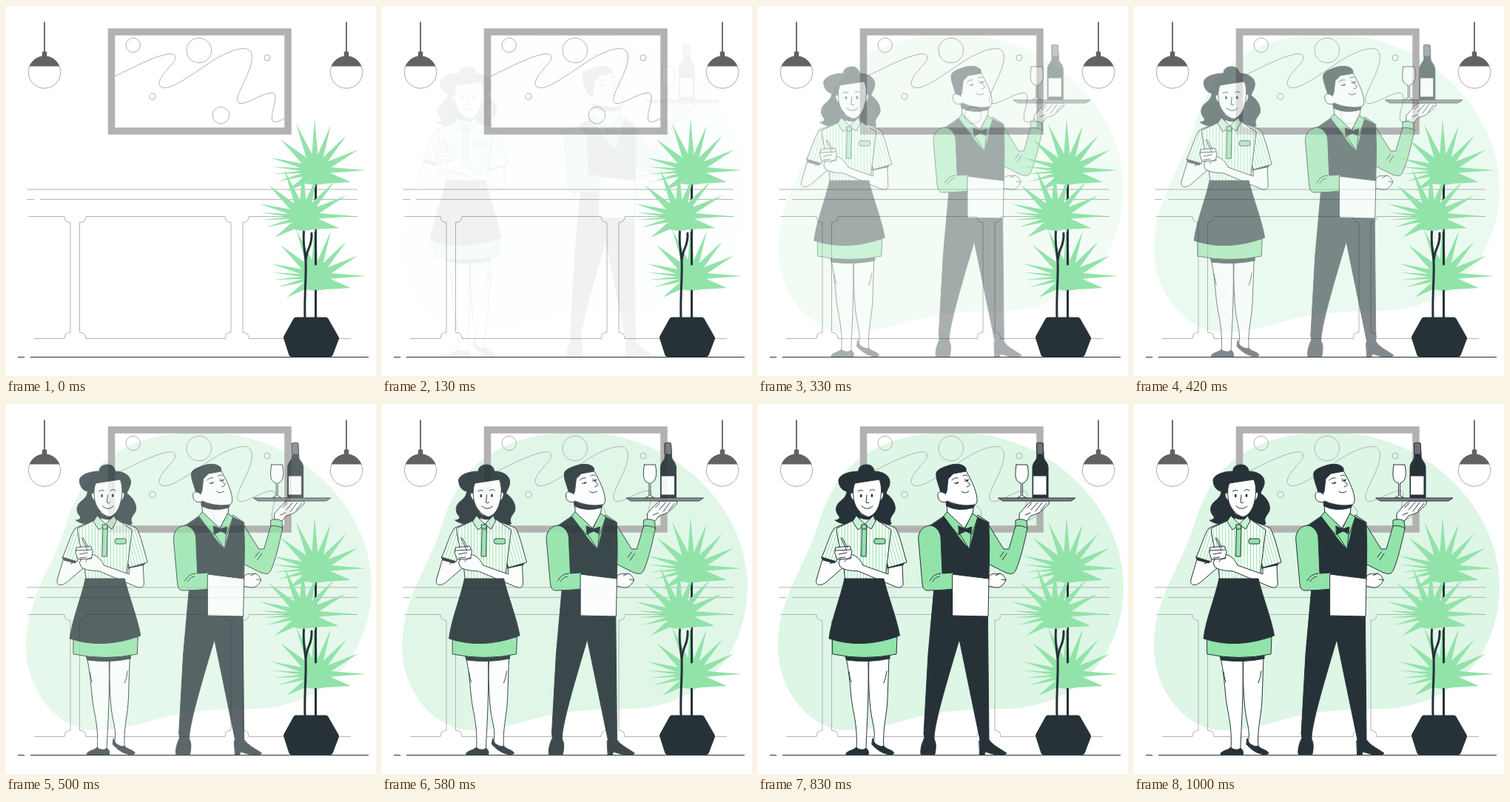
These frames come from a looping animation (500x500 px, 1.04 s). An HTML page:

```html
<!DOCTYPE html>
<html lang="en">
<head>
<meta charset="utf-8">
<title>Restaurant staff</title>
<style>
  html, body { margin: 0; width: 100%; height: 100%; overflow: hidden; background: #fff; }
  svg { display: block; width: 100vw; height: 100vh; }
  .wall { fill: none; stroke: #b2b2b2; stroke-width: 1; }
  .person { stroke: #263238; stroke-width: 1; stroke-linejoin: round; stroke-linecap: round; fill: #fff; }
  .person .dark { fill: #263238; }
  .person .green { fill: #92e3a9; }
  .person .pale { fill: #c8f1d4; }
  .person .line { fill: none; }
  .person .dot { fill: #263238; stroke: none; }
  .stem { fill: none; stroke: #263238; stroke-width: 3; stroke-linecap: round; }
</style>
</head>
<body>
<svg viewBox="0 0 500 500">
  <defs>
    <pattern id="stripe" width="4.2" height="8" patternUnits="userSpaceOnUse">
      <rect width="4.2" height="8" fill="#fff" stroke="none"/>
      <path d="M2 0V8" stroke="#92e3a9" stroke-width="1.1"/>
    </pattern>
    <pattern id="stripeL" href="#stripe" patternTransform="rotate(18)"/>
    <pattern id="stripeR" href="#stripe" patternTransform="rotate(-16)"/>
    <g id="lamp">
      <circle cx="52" cy="89.5" r="21.7" fill="#fff" stroke="#aaa"/>
      <path d="M31.8 81.5C35 73 43 67.6 52 67.6S69 73 72.2 81.5Z" fill="#626262"/>
      <path d="M52 21.500V63" stroke="#626262" stroke-width="1.8"/>
      <rect x="48.800" y="61.500" width="6.400" height="7" rx="1" fill="#626262"/>
    </g>
    <polygon id="leaf" fill="#92e3a9"/>
  </defs>

  <path id="blob" fill="#ddf6e5" d="M27 327C27 265 62 222 81 165C96 115 128 38 265 38C400 38 494 145 494 245C494 340 430 408 340 412C285 412 245 414 200 427C165 438 140 441 122 441C72 441 27 390 27 327Z"/>

  <g class="wall">
    <path d="M28 247.900H475M28 261.400H38M46 261.400H475"/>
    <path d="M30 284.500H79Q79 292.500 87 292.500V441Q79 441 79 449.500H38"/>
    <path d="M108 284.500H296Q296 292.500 304 292.500V441Q296 441 296 449.500H108Q108 441 99.500 441V292.500Q108 292.500 108 284.500Z"/>
    <path d="M475 284.500H328Q328 292.500 320 292.500V441Q328 441 328 449.500H466"/>
    <rect x="142.500" y="35" width="238.500" height="134" stroke-width="9.500"/>
    <path d="M147 95C172 83 198 69 218 65C230 63 232 70 224 79C212 92 203 103 209 109C219 118 256 89 279 74C305 58 329 51 332 65C336 85 309 119 313 129C318 140 351 113 362 118C369 123 356 147 360 155C364 160 371 154 376 152"/>
    <circle cx="171.800" cy="53" r="9.700"/>
    <circle cx="260.800" cy="60" r="16.800"/>
    <circle cx="353" cy="70" r="4"/>
    <circle cx="198" cy="122.300" r="4.300"/>
    <circle cx="290.500" cy="147.700" r="11.300"/>
  </g>
  <use href="#lamp"/>
  <use href="#lamp" x="408"/>
  <path d="M16 474.500H25M33 474.500H490" stroke="#263238"/>

  <g id="woman" class="person">
    <path class="dark" d="M134 91C133 85 139 82 145 82C151 82 155 86 155 91C166 91 175 96 176 104C177 111 172 116 171 121C179 126 185 136 183 144C181 150 174 153 178 162C169 166 157 165 151 160L130 160C122 164 110 163 102 157C106 157 109 155 108 152C101 145 103 136 110 131C115 127 118 123 118 118C111 117 107 110 107 103C108 95 122 91 134 91Z"/>
    <path d="M135 143L136 158L145 166L154 156L154 143Z"/>
    <path class="dark" d="M135 147Q145 156 155 147V153Q145 159 135 153Z"/>
    <path d="M127 121C122 117 121 126 128 131M164 120C169 116 169 127 163 131"/>
    <path d="M129 107Q148 104 162 102C166 112 165 124 162 135C159 146 152 152 147 152.500C140 151 131 143 128 132C126 122 126 113 129 107Z"/>
    <ellipse class="dot" cx="137.300" cy="124" rx="1.400" ry="2.200"/>
    <ellipse class="dot" cx="152" cy="123.800" rx="1.400" ry="2.200"/>
    <path class="line" d="M133 118Q136 115 140 117M149 117Q153 114 156 117M145 123L144 133Q146 135 148 133M138 138Q146 145 153 138"/>

    <path d="M117 343C121 360 122 376 124 396C126 416 133 434 131 466L144 468C144 446 148 410 147 346Z"/>
    <path d="M148 346C147 368 148 394 150 412C152 430 158 443 154 458L168 465C166 440 172 422 173 400L175 343Z"/>
    <path class="line" d="M121 362Q122 371 124 376M172 361Q171 370 168 377"/>
    <path class="dark" d="M117 472C120 468 127 468 131 464C136 469 140 468 144 465Q149 469 147 474H118Z"/>
    <path class="dark" d="M153 452C156 463 164 464 168 462C171 467 180 467 182 472Q179 475 172 473C163 471 157 465 152 460Z"/>
    <path class="dark" d="M116 340H176V344Q148 350 118 346Z"/>
    <path class="green" d="M99 316L186 315L185 338Q142 347 99 338Z"/>

    <path d="M86 207L77 237C75 247 84 246 91 240L113 221L107 207L95 216L104 211Z"/>
    <path class="dark" d="M84 207L104 211L101 215L86 211Z"/>
    <path fill="url(#stripeL)" d="M126 157C116 163 107 164 101 168C95 176 90 195 84 207L104 213L112 180Z"/>
    <path class="dark" d="M172 217L197 213L193 219L174 223Z"/>
    <path fill="url(#stripeR)" d="M158 157C171 163 178 164 184 168C190 178 194 197 199 214L174 221L164 184Z"/>
    <path fill="url(#stripe)" d="M128 157L104 168C106 186 109 195 112 205L116 239H170L172 218L178 170L156 155L145 165Z"/>
    <path class="green" d="M139 165H145L144 206H138Z"/>
    <path class="pale" d="M131 151L143 163L133 170L126 159ZM154 151L157 158L151 169L142 163Z"/>
    <path class="green" d="M138 163H145L144 169H139Z"/>
    <rect class="green" x="155" y="182" width="15" height="7" rx="2.500"/>
    <path d="M193 218L194 240C195 246 192 250 184 247L134 226C126 225 117 226 109 220L107 214L110 209L121 203C129 203 136 209 140 218L174 230L174 222Z"/>
    <path d="M103 194L122 192L125 199L123 209L105 210L102 202Z"/>
    <path class="line" d="M102 198L123 197M110 181L118 198M112 181L119 194M107 203L118 201M107 208L116 207M115 213Q119 207 124 208"/>
    <path class="dark" d="M115 236H168C173 258 186 291 189.500 313Q139 332 94 317C97 291 109 264 115 236Z"/>
  </g>

  <g id="man" class="person">
    <path class="dark" d="M222 473C221 466 224 457 227 451L226 445L240 447L240 453Q244 459 241 473Z"/>
    <path class="dark" d="M301 455L313 450C314 459 330 466 338 472Q337 474 328 474C319 474 314 471 309 470L308 474H302Z"/>
    <path class="dark" d="M240 248L232 338L226 446Q233 451 240 448C243 424 252 392 274 318L302 454Q308 457 314 452L312 248Z"/>
    <path d="M313 236C316 226 324 231 329 229Q335 231 337 238Q335 242 333 244C327 251 321 247 313 246Z"/>
    <path class="line" d="M329 229L323 232M337 238L331 237"/>
    <path d="M355 159L355 148C360 143 365 135 373 131L395 131C397 136 390 139 387 143C382 148 377 149 371 151L364 160Z"/>
    <path class="line" d="M372 134L366 140M380 133L371 143M386 133L377 145M392 134L384 144M363 150L370 147"/>
    <path class="green" d="M312 161L334 196L341 196L350 165L350 157Q358 154 365 158L366 168C362 187 357 209 351 223C348 231 344 230 337 228L311 215Z"/>
    <path class="line" d="M350 165Q358 163 366 168M329 207L334 200M332 211L338 202"/>
    <path class="green" d="M257 148L282 168L299 150L314 160V205L249 205V160Z"/>
    <path d="M256 126L258 148L281 168L292 149L294 133Z"/>
    <path class="dark" d="M256 131Q273 140 295 136L293 140Q273 146 257 138Z"/>
    <path class="green" d="M258 146L281 168L273 177L252 153ZM292 148L299 153L291 176L282 168Z"/>
    <path class="dark" d="M253 152C265 167 276 186 288 196L299 153L313 160C316 190 314 212 314 238L250 231L249 179L234 165Z"/>
    <path class="green" d="M273 173L282 171L290 176L288 196Z"/>
    <path class="dark" d="M273 165L282 169L291 166L290 174L282 172L274 176Z"/>
    <path class="green" d="M234 164C242 164 249 173 249 181L251 229L266 228V250Q247 252 231 252Q225 252 224 243L219 186C217 174 224 165 234 164Z"/>
    <path class="line" d="M234 239Q239 229 249 229M238 240Q241 234 247 233"/>
    <path d="M265 230Q288 233 314 236L313 287L265 286Z"/>

    <path d="M283 90C288 99 293 109 295 115C298 124 300 134 295 136C280 139 266 135 255 130L254 104L264 92Z"/>
    <path class="dark" d="M249 119C246 109 243 102 243 97C241 89 251 86 260 83C269 80 280 81 283 87L283 91L266 94L259 101L257 118L255 122Z"/>
    <path d="M256 122C250 117 244 118 245 124C245 132 252 134 257 132"/>
    <path class="line" d="M264 103Q267 99 272 100M279 97Q283 95 285 97M267 107Q270 109 273 106M281 104Q284 105 287 102M281 101L288 108Q289 111 284 112M277 118Q281 122 287 118"/>
    <circle class="dot" cx="271" cy="106.500" r="1.200"/>
    <circle class="dot" cx="285" cy="103" r="1.200"/>

    <path d="M351 82H366Q369 97 365 103Q362 107 359.500 107V124L365 127H352L357.500 124V107C349 105 349 97 351 82Z"/>
    <path class="dark" d="M379 53H387L388 70C388 77 393 77 394 85V127H373V85C374 77 379 77 379 70Z"/>
    <path fill="#6c7174" d="M379 53Q383 51 387 53L388 68H379Z"/>
    <rect x="374" y="97" width="18" height="26"/>
    <path fill="#7d8183" d="M327 127H431L425 131H333Z"/>
  </g>

  <g>
    <path class="stem" d="M418.500 422V240"/>
    <use href="#leaf" x="418" y="384"/>
    <path class="stem" d="M418.500 422V385M418.500 349V306"/>
    <use href="#leaf" x="418" y="241"/>
    <path class="stem" d="M418.500 262V242"/>
    <use href="#leaf" x="402" y="303"/>
    <path class="stem" d="M404 422C403 388 406 366 405 346C404 330 401 321 402.500 305M405 346C406 325 414 327 413 307"/>
    <path d="M392 424.500H432L446 449L438 470H386L379 448Z" fill="#263238" stroke="#263238" stroke-width="8" stroke-linejoin="round"/>
  </g>
</svg>

<script>
  const LOOP = 1040, FPS = 24, SLIDE = 30;
  const $ = id => document.getElementById(id);

  // Leaf tips, relative to the top of the stalk, clockwise from lower left.
  const tips = [[-39, 10], [-51, -4], [-57, -14], [-59, -24], [-60, -36], [-47, -61], [-26, -82],
    [-1, -89], [21, -80], [42, -66], [58, -47], [69, -19], [48, -3]];
  const heart = [0, -18];
  const notch = (a, b) => heart.map((c, k) => c + ((a[k] + b[k]) / 2 - c) * 0.34);
  const outline = tips.flatMap((tip, i) => i ? [notch(tips[i - 1], tip), tip] : [tip]);
  $('leaf').setAttribute('points', [...outline, [14, -1], [0, 1], [-14, -1]].join(' '));

  const bezier = (a, b, s) => 3 * (1 - s) * s * ((1 - s) * a + s * b) + s ** 3;

  // cubic-bezier(.36, -.01, .5, 1.38)
  function ease(x) {
    let lo = 0, hi = 1;
    for (let i = 0; i < 24; i++) {
      const mid = (lo + hi) / 2;
      if (bezier(0.36, 0.5, mid) < x) lo = mid; else hi = mid;
    }
    return bezier(-0.01, 1.38, hi);
  }

  // Each step begins on a whole hundredth of a second.
  function stepAt(t) {
    let n = FPS;
    while (Math.round(n * 100 / FPS) * 10 > t) n--;
    return n;
  }

  const start = performance.now();
  function draw() {
    const n = stepAt((performance.now() - start) % LOOP);
    const p = n < 3 ? 0 : ease(n / FPS);
    const shift = SLIDE * (1 - p);
    $('woman').setAttribute('transform', `translate(${-shift} 0)`);
    $('man').setAttribute('transform', `translate(${shift} 0)`);
    for (const id of ['blob', 'woman', 'man']) $(id).style.opacity = Math.min(1, p);
    requestAnimationFrame(draw);
  }
  draw();
</script>
</body>
</html>
```
